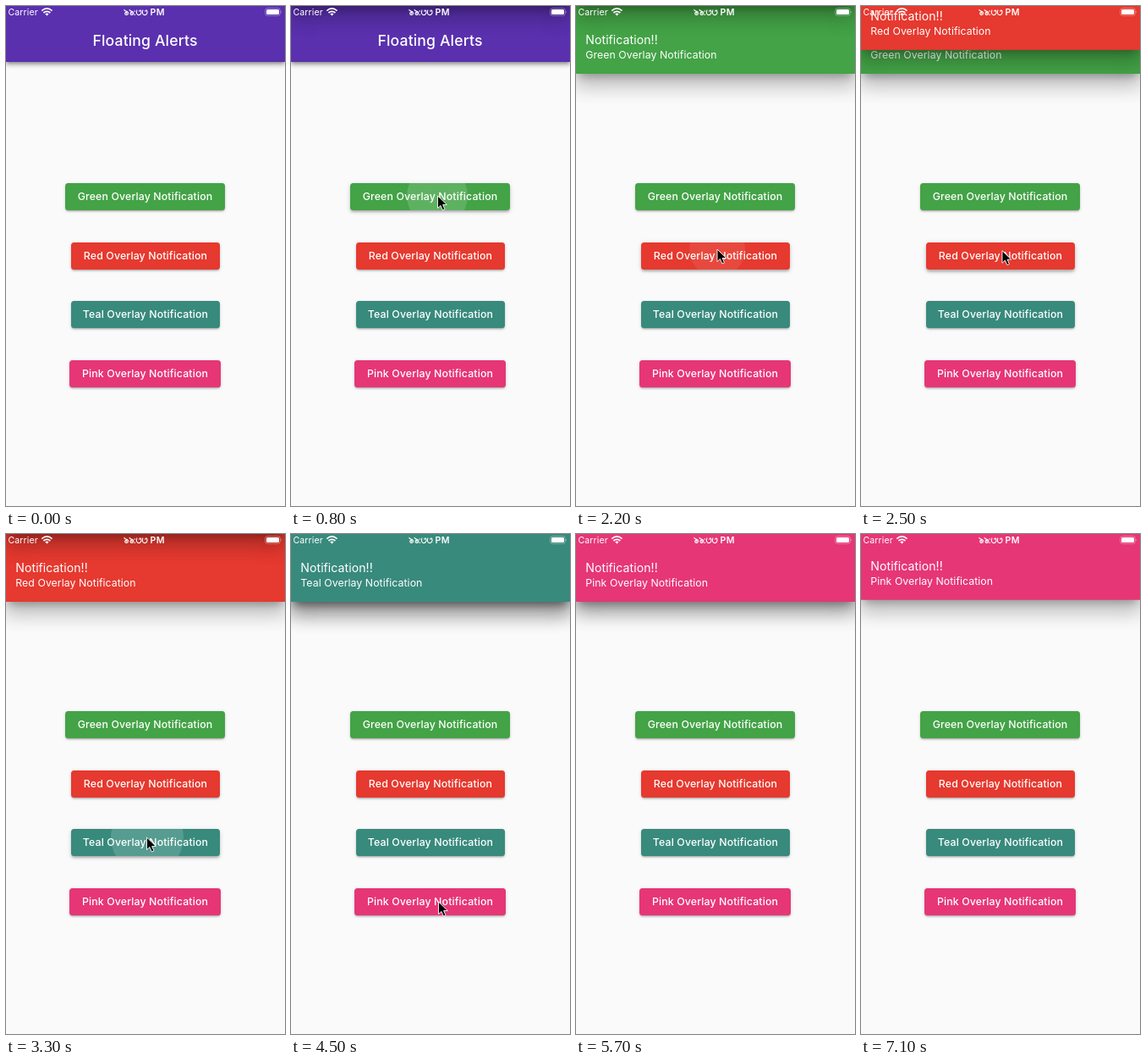
Write an HTML page that moves like this. It is 330 px wide and 590 px high and loops after 7.2 s.

```html
<!DOCTYPE html>
<html lang="en">
<head>
<meta charset="utf-8">
<title>Overlay notifications</title>
<style>
  html, body { margin: 0; width: 100%; height: 100%; overflow: hidden; }
  #stage {
    position: relative; width: 330px; height: 590px; overflow: hidden;
    background: #fafafa; color: #fff; font-family: Inter, sans-serif; white-space: nowrap;
  }
  #stage > *, .toast p { position: absolute; margin: 0; }
  .bar {
    left: 0; top: 0; width: 329px; height: 66px; line-height: 82px;
    background: #5a30ae; text-align: center; padding-right: 1px;
    font-size: 17.6px; font-weight: 500; letter-spacing: .15px;
    box-shadow: 0 2px 3.5px -1px #0004, 0 3.5px 4.5px #0003, 0 1px 9px #0002;
  }
  .btn {
    height: 32px; line-height: 32px; border-radius: 3.5px; overflow: hidden;
    text-align: center; font-size: 12.3px; font-weight: 500; letter-spacing: .15px;
  }
  .btn span { position: relative; }
  .btn i { position: absolute; border-radius: 50%; background: #fff; }
  .toast {
    left: 0; top: 0; width: 330px; height: 80px;
    box-shadow: 0 7px 9px -4px #00000038, 0 14px 21px 2px #00000029, 0 5px 26px 4px #0002;
  }
  .toast p { left: 11.3px; line-height: 20px; letter-spacing: .06px; }
  .toast p:first-child { top: 29.5px; font-size: 14.08px; }
  .toast p:last-child { top: 47.5px; font-size: 12.3px; }
  svg { left: 0; top: 0; overflow: visible; }
</style>
</head>
<body>
<div id="stage">
  <div class="bar">Floating Alerts</div>
  <svg id="status" width="330" height="16" fill="#fff" font-size="10.56">
    <text x="2.5" y="10.9" letter-spacing=".1">Carrier</text>
    <g fill="none" stroke="#fff" stroke-width="1.7">
      <path d="M42.3 5.6Q48.4 .3 54.5 5.6M44.4 8Q48.4 4.6 52.4 8"/>
      <path d="M46.3 9.4Q48.4 7.8 50.5 9.4L48.4 11.6Z" fill="#fff" stroke="none"/>
    </g>
    <g fill="none" stroke="#fff" stroke-width="1.1" stroke-linecap="round">
      <path id="one" d="M139.8 4.4C140 6.6 144.4 5.6 144.5 8.2C144.5 10.9 141 11.1 140.7 8.9C140.6 7.2 142.6 7.2 142.8 8.6"/>
      <use href="#one" x="6.3"/>
      <path id="three" d="M154.9 4.9C153.7 8 154.6 10.6 157 10.6C159.5 10.6 160.5 8 159.8 5.8C159.2 4.5 157.5 5 157.9 6.4"/>
      <use href="#three" x="7"/>
    </g>
    <circle cx="152.3" cy="6" r=".8"/><circle cx="152.3" cy="10.2" r=".8"/>
    <text x="170.4" y="10.9" font-weight="600" letter-spacing=".5">PM</text>
    <rect x="306.7" y="2.7" width="17.6" height="8.6" rx="2.6" fill="none" stroke="#fff" stroke-opacity=".38" stroke-width=".9"/>
    <rect x="308" y="4" width="15" height="6" rx="1.5"/>
    <path d="M325.4 5.4Q327 7 325.4 8.6Z" opacity=".5"/>
  </svg>
  <svg id="cursor" width="12" height="18">
    <path d="M0 0V14.6L3.4 11.4 5.9 17 8.5 15.9 6.1 10.5H10.8Z" stroke="#fff" stroke-width=".9"/>
  </svg>
</div>
<script>
const LOOP = 7200, STEP = 100, SLIDE = 500, LIFE = 2300;
const stage = document.getElementById('stage');
const status = document.getElementById('status');
const cursor = document.getElementById('cursor');

// open: banner start; x, y: tap point; r, glow: ripple when the banner starts
const items = [
  { name: 'Green', color: '#43a346', left: 70, width: 189, top: 209, open: 800, x: 173, y: 224, r: 36, glow: .15 },
  { name: 'Red', color: '#e6392f', left: 77, width: 176, top: 279, open: 2200, x: 167, y: 287, r: 33, glow: .08 },
  { name: 'Teal', color: '#388a7c', left: 77, width: 176, top: 348, open: 3300, x: 166.5, y: 358, r: 43, glow: .15 },
  { name: 'Pink', color: '#e63676', left: 75, width: 179, top: 418, open: 4750, x: 174.5, y: 434, r: 36, glow: .15 }
];

// time, x, y of the pointer tip
const path = [
  [200, 332, 300], [650, 173.5, 224], [1100, 173.5, 224], [1850, 167, 287], [2450, 167, 287],
  [3000, 166.5, 358], [3650, 166.5, 358], [4350, 174.5, 434], [5100, 174.5, 434], [5600, 332, 400]
];

const clamp = v => Math.min(1, Math.max(0, v));
const ease = v => { v = clamp(v); return v * v * (3 - 2 * v); };
const mix = (a, b, k) => a + (b - a) * k;

function add(tag, parent, cls, text) {
  const el = document.createElement(tag);
  if (cls) el.className = cls;
  if (text) el.textContent = text;
  parent.append(el);
  return el;
}

for (const it of items) {
  const label = it.name + ' Overlay Notification';
  it.btn = add('div', stage, 'btn');
  it.btn.style.cssText = `left:${it.left}px;top:${it.top}px;width:${it.width}px;background:${it.color}`;
  it.ripple = add('i', it.btn);
  add('span', it.btn, '', label);
  it.toast = add('div', stage, 'toast');
  it.toast.style.background = it.color;
  add('p', it.toast, '', 'Notification!!');
  add('p', it.toast, '', label);
}
// Buttons stay below every banner; status bar and pointer on top.
items.forEach(it => stage.append(it.toast));
stage.append(status, cursor);

function drawButton(it, t) {
  const dt = t - it.open;
  const hold = clamp((dt + 150) / 150), spread = clamp(dt / 300);
  const r = dt < 0 ? mix(10, it.r, hold) : mix(it.r, 110, ease(dt / 280));
  Object.assign(it.ripple.style, {
    left: it.x - it.left - r + 'px',
    top: it.y - it.top - r + 'px',
    width: 2 * r + 'px',
    height: 2 * r + 'px',
    opacity: it.glow * hold * (1 - ease(spread))
  });
  const lift = dt < 200 ? ease((dt + 100) / 250) : 1 - ease((dt - 200) / 200);
  const y = mix(1.8, 4, lift), blur = mix(2, 5, lift);
  it.btn.style.boxShadow =
    `0 ${y}px ${blur}px -.5px #0004, 0 ${y / 2}px ${blur * 2}px #0000001f`;
}

function drawToast(it, t) {
  const dt = t - it.open;
  const shown = ease(dt / SLIDE) - ease((dt - LIFE) / SLIDE);
  it.toast.style.display = dt >= 0 && dt < LIFE + SLIDE ? '' : 'none';
  it.toast.style.transform = `translateY(${80 * (shown - 1)}px)`;
}

function drawCursor(t) {
  const i = path.findIndex(p => p[0] > t);
  cursor.style.display = i > 0 ? '' : 'none';
  if (i < 1) return;
  const [t0, x0, y0] = path[i - 1], [t1, x1, y1] = path[i];
  const k = ease((t - t0) / (t1 - t0));
  cursor.style.transform = `translate(${mix(x0, x1, k)}px,${mix(y0, y1, k)}px)`;
}

const start = performance.now();
function frame() {
  const t = Math.floor((performance.now() - start) % LOOP / STEP) * STEP;
  for (const it of items) {
    drawButton(it, t);
    drawToast(it, t);
  }
  drawCursor(t);
  requestAnimationFrame(frame);
}
frame();
</script>
</body>
</html>
```
